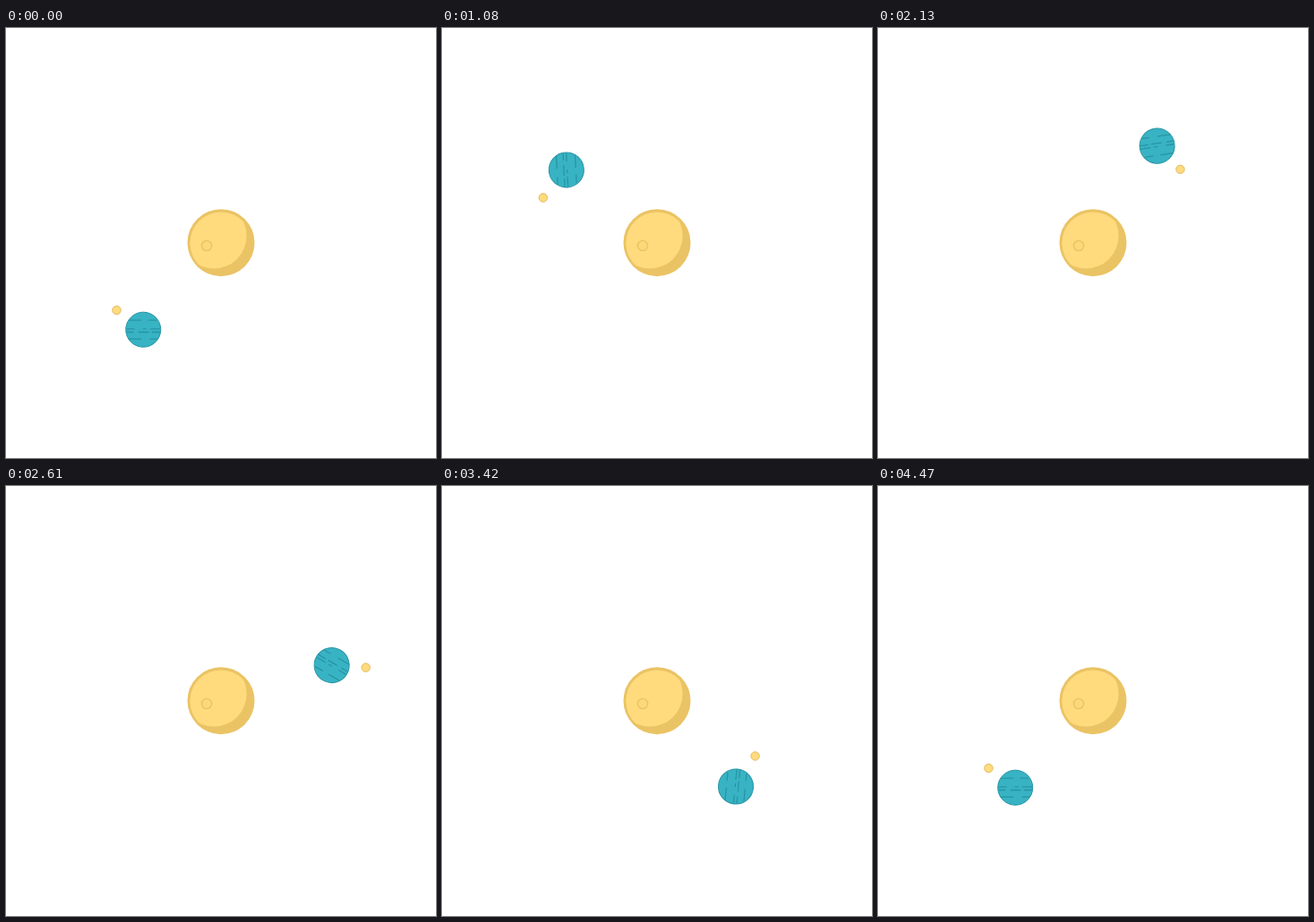
Write an HTML page that moves like this. It is 480x480 px and loops after 4.5 s.

```html
<!DOCTYPE html>
<html lang="en">
<head>
<meta charset="utf-8">
<title>Orbit</title>
<style>
  html, body { margin: 0; width: 100%; height: 100%; overflow: hidden; background: #fff; }
  svg { display: block; width: 100vw; height: 100vh; }
</style>
</head>
<body>
<svg viewBox="0 0 480 480" xmlns="http://www.w3.org/2000/svg">
  <defs>
    <clipPath id="disc"><circle cx="240" cy="240" r="34.6"/></clipPath>
  </defs>
  <g id="sun">
    <circle cx="240" cy="239.7" r="37.5" fill="#eac364"/>
    <circle cx="232" cy="232" r="36.6" fill="#ffdb7d" clip-path="url(#disc)"/>
    <circle cx="224" cy="243" r="5.6" fill="#fdd878" stroke="#eac364" stroke-width="1.4"/>
  </g>
  <g id="planet">
    <circle r="19.5" fill="#38b3c3" stroke="#2795a5"/>
    <path fill="none" stroke="#2795a5" stroke-width="1.3" stroke-linecap="round"
      d="M-15.5-10.5H-2.5M6-10.5H14.5M-18-.8H-10M0-.8H3M8-.8H18.5M-18 2.8H-11.5M-5 2.8H6M10 2.8H18.5M-16 10.5H-2.5M8 10.5H15.5"/>
  </g>
  <circle id="moon" r="4.7" fill="#ffdb7d" stroke="#e2b95c"/>
</svg>
<script>
  const LOOP = 4500, STEP = 30, TURN = LOOP - STEP;
  const planet = document.getElementById('planet');
  const moon = document.getElementById('moon');
  const rad = deg => deg * Math.PI / 180;

  const polar = (r, deg) => [r * Math.cos(rad(deg)), r * Math.sin(rad(deg))];

  function rotate([x, y], deg) {
    const c = Math.cos(rad(deg)), s = Math.sin(rad(deg));
    return [x * c - y * s, x * s + y * c];
  }

  function draw(time) {
    const t = Math.floor((time % LOOP) / STEP) * STEP;
    const spin = 360 * t / TURN;
    const [px, py] = polar(129.9, 131.9 + spin);
    const x = 240 + px, y = 240 + py;
    planet.setAttribute('transform', `translate(${x} ${y}) rotate(${spin})`);

    // The moon circles twice backwards inside the turning frame, slightly off centre.
    const [ox, oy] = polar(38.6, 216.7 - 2 * spin);
    const [mx, my] = rotate([ox + 1.2, oy + 1.4], spin);
    moon.setAttribute('transform', `translate(${x + mx} ${y + my})`);
  }

  function tick() {
    draw(performance.now());
    requestAnimationFrame(tick);
  }
  draw(0);
  requestAnimationFrame(tick);
</script>
</body>
</html>
```
